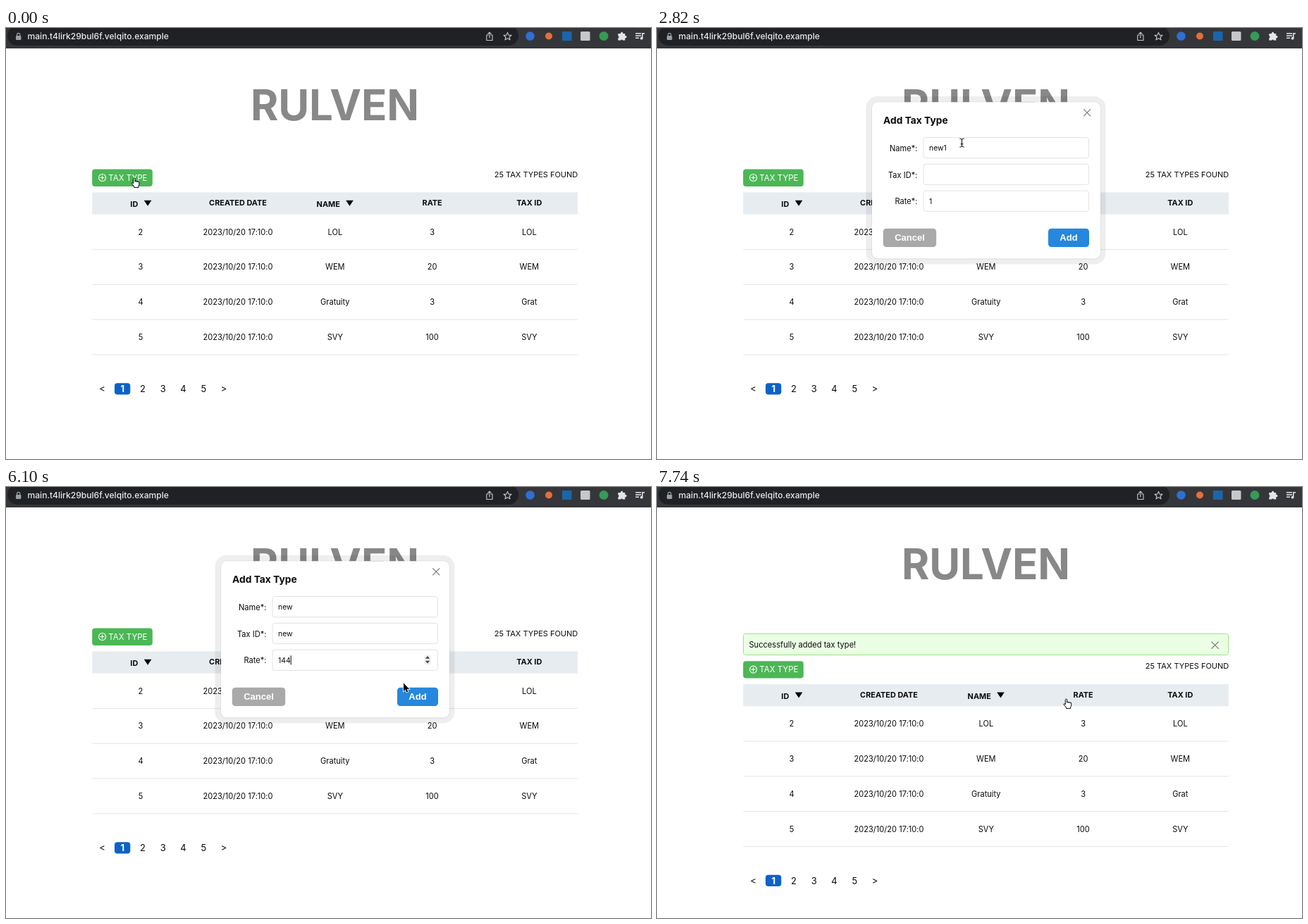
An HTML page for the animation above (8 s loop, 915 by 612 pixels).

```html
<!DOCTYPE html>
<html lang="en">
<head>
<meta charset="utf-8">
<title>Tax types</title>
<style>
html, body { margin: 0; width: 100%; height: 100%; overflow: hidden; background: #fff; }
svg { display: block; width: 915px; height: 612px; }
text { font-family: Inter, "Open Sans", sans-serif; font-size: 11.1px; font-feature-settings: "calt" 0; fill: #0b0b0b; white-space: pre; }
.mid { text-anchor: middle; }
.end { text-anchor: end; }
.head { font-weight: 700; font-size: 10.9px; }
.title { font-weight: 700; font-size: 60px; letter-spacing: -.1px; fill: #888; }
.field { font-size: 10.4px; }
.page { font-size: 13px; }
.btn { font: 700 13px "Liberation Sans", Arial, sans-serif; fill: #fff; }
.line { fill: none; stroke-linecap: round; stroke-linejoin: round; }
</style>
</head>
<body>
<svg id="stage" viewBox="0 0 915 612" xmlns="http://www.w3.org/2000/svg">
  <rect width="915" height="612" fill="#fff"/>

  <!-- browser bar -->
  <rect width="915" height="29" fill="#35363a"/>
  <rect x="2" y="-3" width="725" height="28" rx="14" fill="#202124"/>
  <rect x="14" y="11" width="7.4" height="6" rx="1" fill="#9aa0a6"/>
  <path class="line" d="M15.6 11V9.4a2.1 2.1 0 0 1 4.2 0V11" stroke="#9aa0a6" stroke-width="1.2"/>
  <text x="30.5" y="15.8" style="font-size:12.1px;font-weight:500;fill:#e8eaed">main.t4lirk29bul6f.velqito.example</text>
  <g class="line" stroke="#c8cacd" stroke-width="1.1">
    <path d="M684 10H681.8V17.5H690V10H687.8M685.9 14V6.3M683.6 8.4L685.9 6.2L688.2 8.4"/>
    <path d="M711.5 6.4L713.1 10.1L717 10.4L714 13L715 16.9L711.5 14.8L708 16.9L709 13L706 10.4L709.9 10.1Z"/>
  </g>
  <circle cx="743.5" cy="11.5" r="6.3" fill="#2f6fd0"/>
  <circle cx="770" cy="11.5" r="5" fill="#e2703a"/>
  <rect x="789" y="5" width="13.5" height="13" fill="#1b66a8"/>
  <rect x="815" y="5" width="13.5" height="13" rx="1.5" fill="#c6c7c9"/>
  <circle cx="848" cy="11.5" r="6.5" fill="#369a58"/>
  <g fill="#e3e5e8">
    <path d="M868.3 8H872a1.7 1.7 0 1 1 3.2 0H878.2V11a1.7 1.7 0 1 1 0 3.2V17.5H875a1.6 1.6 0 0 0-3 0H868.3V14.4a1.6 1.6 0 0 0 0-3.1Z"/>
    <path d="M893 7H901V8.5H893ZM893 10.2H901V11.7H893ZM893 13.4H898V14.9H893ZM902 7H906V8.5H903.5V14.5H902Z"/>
    <circle cx="901.6" cy="14.7" r="1.9"/>
  </g>

  <text class="title mid" x="466.5" y="130.5">RULVEN</text>

  <g id="alert">
    <rect x="122.5" y="208.5" width="688" height="30" rx="3" fill="#ebffe4" stroke="#9be48f"/>
    <text x="130.5" y="228.3">Successfully added tax type!</text>
    <path class="line" d="M786.8 219.8l9.6 9.6m0-9.6l-9.6 9.6" stroke="#777" stroke-width="1.2"/>
  </g>

  <g id="list">
    <rect x="122.2" y="200.6" width="85.6" height="24.4" rx="4" fill="#4bb755"/>
    <g class="line" stroke="#fff" stroke-width="1.1">
      <circle cx="136.6" cy="212.5" r="5"/>
      <path d="M134 212.5h5.2M136.6 209.9v5.2"/>
    </g>
    <text x="145.3" y="216.5" style="font-size:11.5px;fill:#fff">TAX TYPE</text>
    <text class="end" x="811.3" y="211.6" style="font-size:11px">25 TAX TYPES FOUND</text>
    <rect x="122.3" y="233.4" width="688.7" height="31.2" fill="#e7ecf1"/>
    <path d="M195.8 244.8h10.6l-5.3 8zM482.2 244.8h10.6l-5.3 8z"/>
  </g>

  <g id="modal">
    <rect x="296.5" y="97" width="340" height="238.5" rx="16" fill="#000" opacity=".065"/>
    <rect x="304" y="104.5" width="326" height="224" rx="9" fill="#000" opacity=".06"/>
    <rect x="305" y="105.3" width="324" height="222" rx="8" fill="#fff"/>
    <text x="321" y="136" style="font-size:13.8px;font-weight:700">Add Tax Type</text>
    <path class="line" d="M605.6 115.6l9.2 9.2m0-9.2l-9.2 9.2" stroke="#777" stroke-width="1.2"/>
    <g id="spin">
      <rect x="593" y="238.5" width="10" height="14" rx="2" fill="#f1f1f1"/>
      <path d="M594.8 243.8l3.2-3.8 3.2 3.8zM594.8 246.8l3.2 3.8 3.2-3.8z" fill="#444"/>
    </g>
    <rect x="320.8" y="284.7" width="75.4" height="26.3" rx="4.5" fill="#a9a9a9"/>
    <text class="btn mid" x="358.5" y="302.4">Cancel</text>
    <rect x="555" y="284.7" width="58" height="26.3" rx="4.5" fill="#2587dd"/>
    <text class="btn mid" x="584" y="302.4">Add</text>
  </g>

  <g id="pointer">
    <path id="hand" d="M-3.2-5.3a1.2 1.2 0 0 1 2.4 0V-1.4a1 1 0 0 1 2-.1v.4a1 1 0 0 1 2 0v.4a1 1 0 0 1 2 .2V2.6L4.2 5.2V6.8H-2V5.4L-5.2 1.6c-.9-1.2.6-2 1.3-1.2L-3.2 1.2z" fill="#fff" stroke="#000" stroke-linejoin="round"/>
    <path id="arrow" d="M0 0V11.5L2.7 9.1 4.4 13 6.3 12.2 4.6 8.4H8.2z" fill="#000" stroke="#fff" stroke-width="1.6" paint-order="stroke"/>
    <g id="beam" class="line">
      <path d="M-2.8-6Q-.5-6 0-4.6Q.5-6 2.8-6M0-4.6V4.6M-2.8 6Q-.5 6 0 4.6Q.5 6 2.8 6M-1.6 1.8H1.6" stroke="#fff" stroke-width="2.6"/>
      <path d="M-2.8-6Q-.5-6 0-4.6Q.5-6 2.8-6M0-4.6V4.6M-2.8 6Q-.5 6 0 4.6Q.5 6 2.8 6M-1.6 1.8H1.6" stroke="#111" stroke-width="1.1"/>
    </g>
  </g>
</svg>
<script>
const LOOP = 8000, OPEN = 300, DONE = 7740, SHIFT = 46.6;
const $ = id => document.getElementById(id);

function add(parent, tag, attrs, text = "") {
  const el = document.createElementNS("http://www.w3.org/2000/svg", tag);
  for (const k in attrs) el.setAttribute(k, attrs[k]);
  el.textContent = text;
  return parent.appendChild(el);
}
const label = (parent, x, y, cls, text) => add(parent, "text", { x, y, class: cls }, text);
const show = (el, on) => el.setAttribute("visibility", on ? "visible" : "hidden");

// table and pager
const list = $("list"), cols = [191, 329, 466.8, 604.6, 742.3];
label(list, 181.8, 254, "head mid", "ID");
label(list, 457.2, 254, "head mid", "NAME");
["CREATED DATE", "RATE", "TAX ID"].forEach((s, i) => label(list, cols[[1, 3, 4][i]], 252, "head mid", s));
[["LOL", 3, "LOL"], ["WEM", 20, "WEM"], ["Gratuity", 3, "Grat"], ["SVY", 100, "SVY"]].forEach((r, i) => {
  const y = 293.6 + i * 49.8;
  [i + 2, "2023/10/20 17:10:0", ...r].forEach((s, c) => label(list, cols[c], y, "mid", s));
  add(list, "rect", { x: 122.3, y: y + 20.3, width: 688.7, height: 1, fill: "#e2e5e8" });
});
add(list, "rect", { x: 154, y: 504.2, width: 22.3, height: 16.2, rx: 4, fill: "#0b62c8" });
["<", "1", "2", "3", "4", "5", ">"].forEach((s, i) => {
  const el = label(list, 136.5 + i * 28.75, 517.4, "page mid", s);
  if (i === 1) el.style.cssText = "fill:#fff;font-weight:700";
});

// form fields
const modal = $("modal"), spin = $("spin");
const fields = ["Name*:", "Tax ID*:", "Rate*:"].map((s, i) => {
  const y = 155.5 + i * 37.8;
  label(modal, 369.5, y + 19.2, "end", s);
  modal.insertBefore(add(modal, "rect", { x: 378, y, width: 234.5, height: 29.3, rx: 3.5, fill: "#fff", stroke: "#e2e2e2" }), spin);
  return { y, el: label(modal, 386, y + 18.4, "field", "") };
});
const caret = add(modal, "rect", { width: 1, height: 13, fill: "#000" });

// time, name, tax id, rate, focused field with visible caret (-1: none), spinner
const form = [
  [0, "", "", "1", -1, 0],
  [890, "", "", "1", 0, 0],
  [1340, "", "", "1", -1, 0],
  [1630, "n", "", "1", 0, 0],
  [1780, "ne", "", "1", 0, 0],
  [1920, "new", "", "1", 0, 0],
  [2220, "new1", "", "1", 0, 0],
  [2820, "new1", "", "1", -1, 0],
  [2970, "new", "", "1", -1, 0],
  [3720, "new", "", "1", 1, 0],
  [4310, "new", "n", "1", 1, 0],
  [4460, "new", "ne", "1", 1, 0],
  [4760, "new", "new", "1", 1, 1],
  [5210, "new", "new", "1", 2, 1],
  [5650, "new", "new", "1", -1, 1],
  [5950, "new", "new", "14", 2, 1],
  [6100, "new", "new", "144", 2, 1],
  [6700, "new", "new", "144", -1, 1],
  [7140, "new", "new", "144", 2, 1],
  [7290, "new", "new", "144", -1, 0]
];

// time, shape, x, y
const moves = [
  [0, "hand", 183.7, 219.6],
  [450, "arrow", 268, 202],
  [600, "arrow", 362, 178],
  [750, "beam", 418, 166],
  [890, "beam", 432.5, 163],
  [3270, "beam", 433, 172],
  [3420, "beam", 434, 196],
  [3570, "beam", 436, 214],
  [3720, "beam", 436, 217],
  [4760, "arrow", 532.5, 272.5],
  [4910, "arrow", 532, 267],
  [5060, "beam", 531, 254],
  [5210, "beam", 531, 251],
  [6100, "arrow", 564, 278.5],
  [6250, "arrow", 574, 281],
  [6400, "hand", 588, 296],
  [6550, "hand", 598, 303],
  [6700, "hand", 594, 306],
  [6840, "hand", 588, 308],
  [6990, "hand", 584, 308.5],
  [7140, "hand", 582.5, 307.6]
];

const at = (keys, t) => keys.findLast(k => k[0] <= t);

function draw(t) {
  const done = t >= DONE;
  show($("alert"), done);
  list.setAttribute("transform", `translate(0 ${done ? SHIFT : 0})`);

  const open = t >= OPEN && !done;
  modal.setAttribute("display", open ? "inline" : "none");
  if (open) {
    const [, name, tax, rate, focus, hover] = at(form, t);
    [name, tax, rate].forEach((s, i) => { fields[i].el.textContent = s; });
    show(spin, hover);
    show(caret, focus >= 0);
    if (focus >= 0) {
      const { y, el } = fields[focus];
      caret.setAttribute("x", 386 + (el.textContent ? el.getComputedTextLength() : 0));
      caret.setAttribute("y", y + 8.2);
    }
  }

  const [, shape, x, y] = at(moves, t);
  $("pointer").setAttribute("transform", `translate(${x} ${y})`);
  for (const id of ["hand", "arrow", "beam"]) show($(id), id === shape);
}

const start = performance.now();
function tick() {
  draw((performance.now() - start) % LOOP);
  requestAnimationFrame(tick);
}
tick();
</script>
</body>
</html>
```
